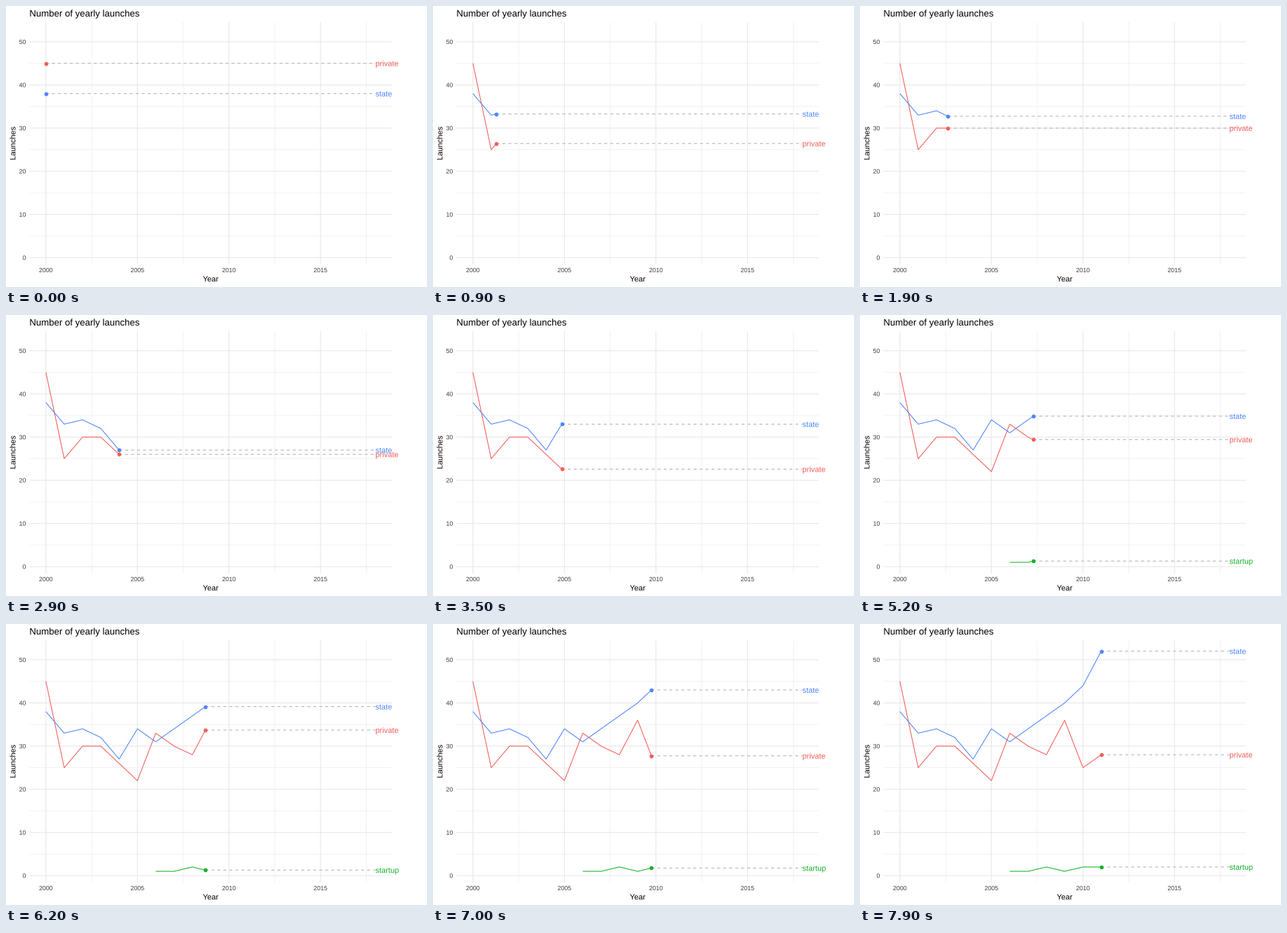
Recreate the animation shown at these times as a matplotlib script. Size 600 by 400 pixels, loop 8 s.

```python
import matplotlib.pyplot as plt
import numpy as np
from matplotlib.animation import FuncAnimation
from matplotlib.patches import PathPatch
from matplotlib.textpath import TextPath
from matplotlib.transforms import Affine2D

W, H, DPI = 600, 400, 100
FRAMES, INTERVAL = 80, 100
PT = 72 / DPI                # points per pixel
LINE = 1.067 * PT
GRID, DASH, TICK = "#E7E7E7", "#B2B2B2", "#3D3D3D"
CAP = 0.718                  # cap height relative to font size
FONT = {"family": "Liberation Sans"}

# name: (colour, first year offset, yearly values)
SERIES = {
    "private": ("#F35E5A", 0, [45, 25, 30, 30, 26, 22, 33, 30, 28, 36, 25, 28]),
    "startup": ("#17B12B", 6, [1, 1, 2, 1, 2, 2]),
    "state": ("#5086FF", 0, [38, 33, 34, 32, 27, 34, 31, 34, 37, 40, 44, 52]),
}
LAST = 18
# The full timeline covers 18 years in 129 steps; each year sits on a whole step.
YEAR_STEPS = [round(i * 129 / LAST) for i in range(12)]


def px(year):
    return 56.85 + 26.09 * np.asarray(year)


def py(value):
    return 41.8 + 6.146 * np.asarray(value)


LEFT, RIGHT = px(-0.9), px(LAST + 0.9)
BOTTOM, TOP = py(-1.55), py(54.55)

plt.rcParams["path.snap"] = False
fig = plt.figure(figsize=(W / DPI, H / DPI), dpi=DPI, facecolor="white")
ax = fig.add_axes([0, 0, 1, 1])
ax.set(xlim=(0, W), ylim=(0, H))
ax.axis("off")


def place(patch, x, y, angle=0):
    move = Affine2D().rotate_deg(angle).translate(x, y)
    patch.set_transform(move + ax.transData)


def label(text, size, color, x=0, y=0, align=0, angle=0, zorder=6):
    """Text with its baseline at y; align 0, 0.5 or 1 as left, centre, right."""
    path = TextPath((0, 0), text, size=size, prop=FONT)
    if align:
        box = path.get_extents()
        path = path.transformed(Affine2D().translate(-align * (box.x0 + box.x1), 0)
                                if align == 0.5 else
                                Affine2D().translate(-box.x1 - 0.04 * size, 0))
    patch = PathPatch(path, facecolor=color, linewidth=0, zorder=zorder)
    ax.add_patch(patch)
    place(patch, x, y, angle)
    return patch


def grid(xs, ys, width, zorder):
    style = dict(color=GRID, lw=width, zorder=zorder, solid_capstyle="butt")
    for y in py(ys):
        ax.plot([LEFT, RIGHT], [y, y], **style)
    for x in px(xs):
        ax.plot([x, x], [BOTTOM, TOP], **style)


grid(np.arange(2.5, 18, 5), np.arange(5, 50, 10), LINE / 2, 0)
grid(np.arange(0, 16, 5), np.arange(0, 51, 10), LINE, 1)

for v in range(0, 51, 10):
    label(str(v), 8.8, TICK, LEFT - 4.95, py(v) - 8.8 * CAP / 2, align=1)
for i in range(0, 16, 5):
    label(str(2000 + i), 8.8, TICK, px(i), 21.05, align=0.5)
label("Number of yearly launches", 13.2, "black", LEFT, 385.02)
label("Year", 11, "black", (LEFT + RIGHT) / 2, 7.8, align=0.5)
label("Launches", 11, "black", 13.4, (BOTTOM + TOP) / 2, align=0.5, angle=90)


class Track:
    def __init__(self, name, color, start, values):
        self.start, self.values = start, np.array(values)
        self.years = start + np.arange(len(values))
        self.line, = ax.plot([], [], color=color, lw=LINE, zorder=2,
                             solid_capstyle="butt", solid_joinstyle="round")
        self.lead, = ax.plot([], [], color=DASH, lw=LINE, ls=(0, (4, 4)), zorder=3)
        self.dot, = ax.plot([], [], "o", color=color, ms=5.68 * PT, mew=0, zorder=4)
        self.tag = label(name, 11, color, zorder=5)
        self.parts = [self.line, self.lead, self.dot, self.tag]

    def show(self, t):
        for part in self.parts:
            part.set_visible(t >= self.start)
        value = np.interp(t, self.years, self.values)
        past = self.years < t
        x, y = px(t), py(value)
        self.line.set_data(px(np.append(self.years[past], t)),
                           py(np.append(self.values[past], value)))
        self.lead.set_data([x, px(LAST)], [y, y])
        self.dot.set_data([x], [y])
        place(self.tag, px(LAST), y - 11 * CAP / 2)


tracks = [Track(name, *spec) for name, spec in SERIES.items()]


def update(n):
    t = np.interp(n, YEAR_STEPS, range(len(YEAR_STEPS)))
    for track in tracks:
        track.show(t)
    return [part for track in tracks for part in track.parts]


anim = FuncAnimation(fig, update, frames=FRAMES, interval=INTERVAL,
                     repeat=True, repeat_delay=0, blit=False)
plt.show()
```
